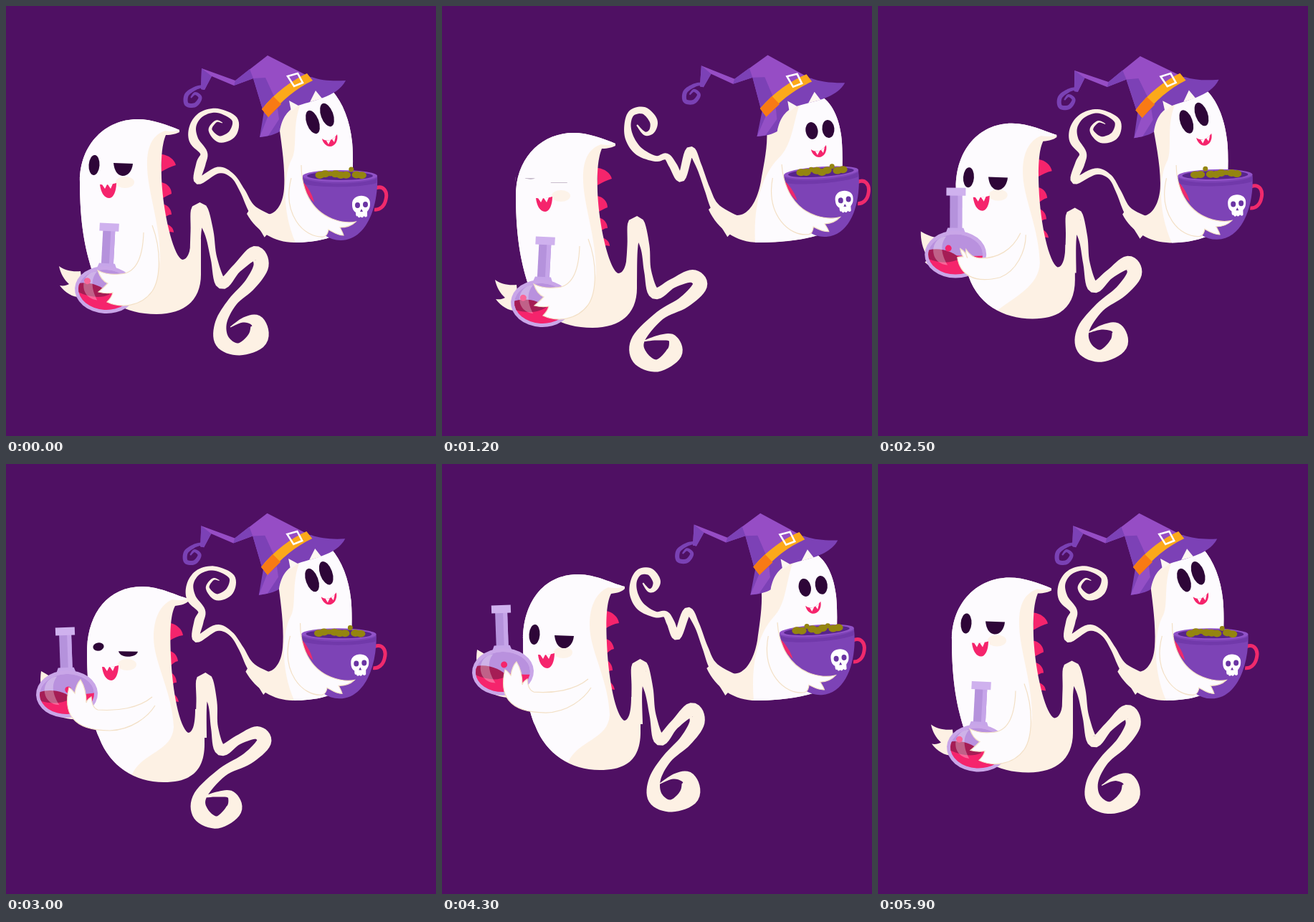
An HTML page for the animation above (6 s loop, 600x600 px).

```html
<!DOCTYPE html>
<html lang="en">
<head>
<meta charset="utf-8">
<title>Two ghosts</title>
<style>
html, body { margin: 0; width: 100%; height: 100%; overflow: hidden; background: #4f1063; }
svg { display: block; width: 100vw; height: 100vh; }
</style>
</head>
<body>
<svg viewBox="0 0 600 600" xmlns="http://www.w3.org/2000/svg">
  <defs><clipPath id="glass"><ellipse rx="38" ry="28"/></clipPath></defs>
  <rect width="600" height="600" fill="#4f1063"/>

  <g id="potion">
    <path id="tailL" fill="#fdf1e4"/>
    <g id="bodyL">
      <path id="spikes" fill="#f5246c"/>
      <path id="skinL" fill="#fdf1e4"/>
      <path id="lightL" fill="#fdfbfe"/>
      <g id="faceL">
        <ellipse cx="166" cy="246" rx="13" ry="8" fill="#fdf3e9"/>
        <path d="M131 249C139 250 147 249 154 247C154 258 150 268 144 268C136 268 132 258 131 249Z" fill="#f5246c"/>
        <path d="M134 249l4 6 3-6zM142 249l4 6 3-7z" fill="#fdfbfe"/>
      </g>
      <g fill="#2e0638">
        <g id="eyeL1"><ellipse rx="7.5" ry="14" transform="rotate(4)"/></g>
        <g id="eyeL2"><path d="M-13-9L14-8C13 3 6 10-1 9C-8 8-12 1-13-9Z"/></g>
      </g>
      <path id="farHand" fill="#fdf1e4"/>
      <g id="flask">
        <rect x="-8" y="-84" width="17" height="56" fill="#b592dc"/>
        <rect x="3" y="-84" width="6" height="56" fill="#c6a5e9"/>
        <rect x="-13" y="-93" width="27" height="11" fill="#cfb1ee"/>
        <path d="M-11-37h22l3 8h-28z" fill="#c6a5e9"/>
        <ellipse rx="43" ry="33" fill="#c9a6e8"/>
        <g clip-path="url(#glass)">
          <ellipse rx="38" ry="28" fill="#b991de"/>
          <g id="liquid">
            <path d="M-60-4C-30-8-10 8 60 0V50H-60Z" fill="#f5246c"/>
            <path d="M-44-4C-25-12-2-4 6 6C-8 14-25 12-44 4Z" fill="#a51d55"/>
          </g>
          <circle id="bubble" r="4.5" fill="#f5246c"/>
          <path d="M-31-8C-29-20-20-25-13-25C-22-14-20 0-11 15C-24 14-32 5-31-8Z" fill="#fff" opacity=".3"/>
        </g>
      </g>
      <path id="armL" fill="#fdfbfe" stroke="#f3e0c6" stroke-width="1.2"/>
    </g>
  </g>

  <g id="witch">
    <path id="tailR" fill="#fdf1e4"/>
    <path id="skinR" fill="#fdf1e4"/>
    <path id="lightR" fill="#fdfbfe"/>
    <ellipse id="eyeR1" fill="#2e0638"/>
    <ellipse id="eyeR2" fill="#2e0638"/>
    <g id="mouthR">
      <path d="M-11-3C-5 2 4 0 10-9C12 0 7 8 0 8C-5 8-10 3-11-3Z" fill="#f5246c"/>
      <path d="M-5 0l3 5 3-6zM3-2l3 4 2-8z" fill="#fdfbfe"/>
    </g>
    <g id="hat">
      <path id="curl" fill="#7a41b4"/>
      <path d="M365 69L320 104L273 87L272 116L277 117L287 98L318 111L345 101L358 144L426 100Z" fill="#964dc5"/>
      <path d="M273 87L272 116L277 117L287 98ZM320 104L318 111L345 101L340 88Z" fill="#7c41b6"/>
      <path d="M345 101L362 100L374 126L358 144Z" fill="#7c41b6"/>
      <path d="M360 147L354 183C366 182 376 179 382 175C385 155 394 145 405 140C425 132 462 128 474 104C455 105 440 104 426 99Z" fill="#7c41b6"/>
      <path d="M365 155L379 143L381 158L366 181L354 183Z" fill="#9450c6"/>
      <path d="M398 147L395 132L408 139ZM424 134L432 118L441 129Z" fill="#fdf6f2"/>
      <path d="M357 144C375 121 400 103 420 94L428 104C405 115 385 131 366 155Z" fill="#fca91a"/>
      <path d="M357 144L373 126L384 137L366 155Z" fill="#f97a14"/>
      <path d="M393 98L407 94L414 107L402 112Z" fill="none" stroke="#fff" stroke-width="2.6"/>
    </g>
    <g id="cup">
      <path d="M516 254C526 250 533 258 530 270C528 280 521 285 514 284" fill="none" stroke="#f02a6c" stroke-width="5"/>
      <path d="M414 237C412 275 430 327 467 327C505 327 520 275 518 237Z" fill="#7d43b6"/>
      <path d="M414 240C430 250 500 250 518 240L517 247C495 254 435 254 415 248Z" fill="#7139aa"/>
      <ellipse cx="466" cy="237" rx="52" ry="8" fill="#9152c8"/>
      <ellipse cx="466" cy="237" rx="46" ry="6" fill="#57248b"/>
      <g id="brew" fill="#94850f"></g>
      <path d="M415 246C417 258 422 267 430 274C428 264 421 252 415 246Z" fill="#f02a6c"/>
      <path d="M483 277C482 261 509 261 508 276C508 283 505 285 504 287L504 293Q502 296 499.500 293Q497 297 495 294Q492 297 490.500 293Q488 295 488 288C485 286 483 283 483 277Z" fill="#fff"/>
      <path d="M487 278a3.500 4 0 1 0 7 0a3.500 4 0 1 0-7 0M498 277a3.500 4 0 1 0 7 0a3.500 4 0 1 0-7 0M496 283l-2 4h4z" fill="#6a34a3"/>
    </g>
    <g id="armR">
      <path d="M412 222C412 255 425 285 455 297C468 302 478 303 488 301C482 307 474 309 466 309C468 313 470 316 471 320C462 320 456 315 450 312C449 318 447 321 443 322C415 324 385 290 398 240" fill="#fdfbfe" stroke="#f3e0c6" stroke-width="1.2"/>
    </g>
  </g>
</svg>
<script>
const LOOP = 6000;
const ui = {};
document.querySelectorAll('svg [id]').forEach(n => ui[n.id] = n);
const set = (id, name, value) => ui[id].setAttribute(name, value);
const lerp = (a, b, k) => a + (b - a) * k;
const smooth = (t, a, b) => {
  const k = Math.min(1, Math.max(0, (t - a) / (b - a)));
  return k * k * (3 - 2 * k);
};

// Smooth curve through [time, value] pairs, flat at both ends.
function track(keys, t) {
  const slope = i => i < 1 || i > keys.length - 2 ? 0
    : (keys[i + 1][1] - keys[i - 1][1]) / (keys[i + 1][0] - keys[i - 1][0]);
  let i = 0;
  while (i < keys.length - 2 && t > keys[i + 1][0]) i++;
  const [t0, a] = keys[i], [t1, b] = keys[i + 1], h = t1 - t0, k = (t - t0) / h;
  const k2 = k * k, k3 = k2 * k;
  return a * (2 * k3 - 3 * k2 + 1) + b * (3 * k2 - 2 * k3)
    + h * (slope(i) * (k3 - 2 * k2 + k) + slope(i + 1) * (k3 - k2));
}

const numbers = s => s.match(/-?[\d.]+/g).map(Number);
const weigh = (lists, w) => lists[0].map((_, i) => lists.reduce((sum, l, j) => sum + l[i] * w[j], 0));

// Paths with equal commands, blended by weights.
function morph(...poses) {
  const lists = poses.map(numbers), words = poses[0].split(/-?[\d.]+/);
  return w => {
    const v = weigh(lists, w);
    return words.map((s, i) => s + (i < v.length ? v[i].toFixed(2) : '')).join('');
  };
}

// Ribbon outline from a flat list of x, y, width.
function ribbon(p) {
  const n = p.length / 3, at = (i, c) => p[Math.min(n - 1, Math.max(0, i)) * 3 + c];
  const spline = (i, k, c) => {
    const a = at(i - 1, c), b = at(i, c), d = at(i + 1, c), e = at(i + 2, c);
    return b + .5 * k * (d - a + k * (2 * a - 5 * b + 4 * d - e + k * (3 * (b - d) + e - a)));
  };
  const mid = [];
  for (let i = 0; i < n - 1; i++)
    for (let k = 0; k < 1; k += .125) mid.push([0, 1, 2].map(c => spline(i, k, c)));
  mid.push([0, 1, 2].map(c => at(n - 1, c)));
  const left = [], right = [];
  mid.forEach(([x, y, w], i) => {
    const a = mid[Math.max(0, i - 1)], b = mid[Math.min(mid.length - 1, i + 1)];
    const dx = b[0] - a[0], dy = b[1] - a[1], s = Math.max(w, .5) / 2 / (Math.hypot(dx, dy) || 1);
    left.push((x - dy * s).toFixed(2) + ' ' + (y + dx * s).toFixed(2));
    right.unshift((x + dy * s).toFixed(2) + ' ' + (y - dx * s).toFixed(2));
  });
  return 'M' + left.concat(right).join('L') + 'Z';
}

// Potion ghost: flask low, flask raised
const skinL = morph(
  'M242 173C225 166 205 158 183 158C140 158 103 192 103 245C103 310 112 345 122 375C133 410 165 430 210 430C250 430 273 410 272 372L272 325L258 325C258 345 252 354 246 354C234 350 219 290 217 240C216 205 219 190 223 180C232 180 238 178 242 176Z',
  'M255 171C238 167 215 154 190 154C140 154 113 195 113 245C113 290 118 340 130 365C145 405 180 427 220 427C260 427 278 410 277 370L277 325L264 325C264 348 260 358 254 358C242 350 232 300 230 250C228 210 231 190 236 181C245 180 251 178 255 174Z');
const lightL = morph(
  'M242 173C225 166 205 158 183 158C140 158 103 192 103 245C103 310 112 345 122 375C127 393 138 408 155 417C190 415 215 380 215 350C214 300 198 260 197 225C196 195 205 180 222 174C230 176 236 175 242 173Z',
  'M255 171C238 167 215 154 190 154C140 154 113 195 113 245C113 290 118 340 130 365C139 388 155 407 176 416C190 385 232 385 234 350C232 300 206 260 206 225C206 200 214 180 232 172C240 174 248 173 255 171Z');
const armL = morph(
  'M192 316C191 350 182 374 158 374C148 375 138 374 128 369C131 378 135 384 142 387C138 391 134 395 129 399C137 401 143 401 149 400C148 405 145 409 141 413C160 422 188 420 204 398C216 380 217 340 204 306',
  'M204 300C185 316 155 320 128 318C122 316 119 308 119 300C116 302 113 304 112 308C112 294 109 284 104 276C99 281 97 288 96 295C93 291 90 288 88 287C80 320 90 347 145 347C175 346 198 328 208 312');
const farHand = morph(
  'M74 363C82 369 92 371 104 370L108 406C96 408 84 402 75 390C80 391 84 390 88 388C81 382 76 373 74 363Z',
  'M49 259C55 262 60 266 70 270L100 326C85 327 70 322 58 314C58 312 56 306 54 300C48 288 47 272 49 259Z');
const spikes = morph(
  'M217 207C227 208 235 214 237 222C230 224 224 227 217 231ZM216 246C225 247 231 254 231 262C226 264 222 266 217 269ZM217 276C226 277 231 284 231 291C227 291 224 293 219 296ZM222 304C229 305 234 310 234 316C231 315 228 315 225 316Z',
  'M229 205C238 206 246 214 247 222C240 223 234 226 229 229ZM228 244C235 245 239 251 240 258C235 259 232 262 228 266ZM228 273C234 275 238 281 238 288C234 288 231 290 228 293ZM230 302C236 304 240 309 241 315C237 314 234 314 231 315Z');
const tailL = [
  '264 365 16 265 315 15 270 285 22 283 315 13 290 352 9 301 387 16 322 366 13 347 345 20 356 362 21 341 388 17 316 413 13 300 442 16 302 468 21 325 479 17 351 464 28 350 441 20 332 438 7 313 448 1',
  '264 384 16 266 334 15 271 304 22 283 335 13 287 370 10 297 401 16 322 387 13 349 377 18 360 390 20 338 413 17 304 432 13 274 465 18 276 490 23 300 502 17 324 484 22 321 464 12 302 463 7 280 468 1'
].map(numbers);

// Witch ghost: near, far, returning
const skinR = morph(
  'M380 160C384 190 390 225 388 255C386 282 372 294 360 290C350 290 345 284 342 280L336 290C350 315 375 330 402 330C430 330 470 325 475 300C485 260 485 210 483 190C480 160 470 135 455 118L400 130Z',
  'M452 165C457 190 448 225 445 245C440 272 428 292 412 292C400 291 390 284 381 276L372 284C385 312 410 330 442 330C475 330 545 325 550 300C560 260 560 200 557 180C553 150 540 130 525 124L480 135Z',
  'M388 160C394 190 405 225 404 255C401 282 388 300 374 296C365 294 360 288 356 284L350 292C360 315 388 331 417 331C445 331 485 320 490 300C498 260 498 205 496 190C493 160 484 135 470 122L410 132Z');
const lightR = morph(
  'M412 135C398 165 408 200 398 215C386 240 386 290 404 330C430 330 470 325 475 300C485 260 485 210 483 190C480 160 470 135 455 118Z',
  'M498 140C490 165 488 195 470 212C450 232 434 270 437 330C475 330 545 325 550 300C560 260 560 200 557 180C553 150 540 130 525 124Z',
  'M422 138C408 165 420 205 412 222C400 245 402 290 420 331C445 331 485 320 490 300C498 260 498 205 496 190C493 160 484 135 470 122Z');
const tailR = [
  '372 310 34 344 284 12 330 258 7 316 237 6 296 229 9 268 244 10 272 220 13 276 205 10 262 187 13 261 167 9 273 151 7 295 146 6 319 158 8 316 178 11 298 186 9 285 173 5 293 161 3 302 163 1',
  '410 310 34 382 282 13 370 255 8 358 222 8 346 202 12 334 240 11 322 222 11 313 210 9 298 213 8 275 203 12 262 185 12 259 165 9 265 149 9 282 146 10 295 160 11 293 174 8 283 178 5 272 166 2',
  '385 315 34 358 290 12 346 262 7 336 240 6 316 233 9 286 243 10 298 220 13 302 206 10 292 188 12 294 170 10 308 155 7 330 149 5 355 163 8 352 183 11 332 187 9 318 174 5 328 163 3 340 167 1'
].map(numbers);
// eye x y ry tilt, eye x y ry tilt, mouth x y, hat x y turn, cup x y turn
const rig = [
  [428, 162, 17, -20, 448, 152, 17, -20, 452, 188, 0, 0, 0, 0, 0, 0],
  [516, 174, 12, -10, 539, 171.5, 12.5, -6, 526, 203, 87, 1, 2, 66, -5, -4],
  [436, 161, 17, -20, 459, 150, 17, -20, 462, 185, 8, 0, -3, 15, -3, -3]
];
const farKeys = [[0, 0], [425, .7], [690, .96], [900, 1.04], [1172, 1], [1252, .88], [1372, .55],
  [1600, .22], [1800, .08], [1950, 0], [3000, 0]];
const backKeys = [[0, 0], [1172, 0], [1252, .12], [1372, .45], [1600, .78], [1800, .92], [1950, 1],
  [2500, .3], [2900, -.12], [3000, 0]];
const blinkKeys = [[0, 1], [850, 1], [1000, .42], [1120, .05], [1230, .05], [1400, 1], [2000, 1]];

set('curl', 'd', ribbon(numbers('275 112 4 264 115 5 252 124 6 252 137 6 264 138 6 271 128 5 264 122 4 258 128 2')));

const lumps = [];
for (let i = 0; i < 9; i++) {
  const c = document.createElementNS('http://www.w3.org/2000/svg', 'ellipse');
  c.setAttribute('cx', 438 + i * 7.3);
  ui.brew.append(c);
  lumps.push(c);
}

function drawPotion(t) {
  const bob = (1 - Math.cos(Math.PI * t / 1000)) / 2;
  const r = smooth(t, 2200, 2750) * (1 - smooth(t, 5350, 5850));
  const low = bob / .905, high = (bob - .206) / .794;
  const w = [1 - r, r], k = lerp(low, high, r);
  const extra = r * high;
  const paths = { skinL, lightL, armL, farHand, spikes };
  for (const id in paths) set(id, 'd', paths[id](w));
  set('bodyL', 'transform', `translate(0 ${lerp(19 * low, 17 * high, r)})`);
  set('armL', 'transform', `translate(0 ${8 * extra})`);
  set('farHand', 'transform', `translate(0 ${13 * extra})`);
  const turn = lerp(3, -2, r);
  set('flask', 'transform', `translate(${lerp(139, 85, r)} ${lerp(396, 290, r) + 14 * extra}) rotate(${turn})`);
  set('liquid', 'transform', `rotate(${5 * Math.cos(Math.PI * t / 1000) - turn})`);
  set('bubble', 'cx', lerp(-26, 2, r));
  set('bubble', 'cy', -11 + 5 * bob);
  set('faceL', 'transform', `translate(${3 * r} ${17 * r})`);
  const lid = Math.min(1, track(blinkKeys, t % 2000));
  set('eyeL1', 'transform', `translate(${lerp(123, 129, r)} ${lerp(222, 238, r)}) scale(1 ${lid})`);
  set('eyeL2', 'transform', `translate(${lerp(163, 170, r)} ${lerp(228, 248, r)}) scale(1 ${lid})`);
  const tail = weigh(tailL, [1 - k, k]), last = tail.length / 3 - 1;
  for (let i = 0; i <= last; i++) {
    tail[i * 3] += r * lerp(8, -9, i / last);
    tail[i * 3 + 1] -= 2 * r;
  }
  set('tailL', 'd', ribbon(tail));
}

function drawWitch(t) {
  const p = (t - 80 * Math.sin(Math.PI * t / LOOP) ** 2 + 3000) % 3000;
  const far = track(farKeys, p), back = track(backKeys, p);
  const w = [1 - far - back, far, back];
  set('skinR', 'd', skinR(w));
  set('lightR', 'd', lightR(w));
  set('tailR', 'd', ribbon(weigh(tailR, w)));
  const v = weigh(rig, w);
  ['eyeR1', 'eyeR2'].forEach((id, i) => {
    const [x, y, ry, tilt] = v.slice(i * 4);
    set(id, 'rx', 8.5);
    set(id, 'ry', ry);
    set(id, 'transform', `translate(${x} ${y}) rotate(${tilt})`);
  });
  set('mouthR', 'transform', `translate(${v[8]} ${v[9]})`);
  const lift = p < 1000 ? 10 * far * (1 - far) : 0;
  set('hat', 'transform', `translate(${v[10]} ${v[11] - lift}) rotate(${v[12]} 412 140)`);
  const hold = `translate(${v[13]} ${v[14]}) rotate(${v[15]} 467 280)`;
  set('cup', 'transform', hold);
  set('armR', 'transform', hold);
  lumps.forEach((c, i) => {
    const s = Math.sin(2 * Math.PI * (t / 1000 + i * .37));
    const small = i % 4 === 2;
    c.setAttribute('cy', 237 - (small ? 6 + 3 * s : 1 + s + i % 2));
    c.setAttribute('rx', small ? 3.5 : 6.5);
    c.setAttribute('ry', small ? 3.5 : 5);
  });
}

function draw(now) {
  const t = now % LOOP;
  drawPotion(t);
  drawWitch(t);
}

const start = performance.now();
function tick() {
  draw(performance.now() - start);
  requestAnimationFrame(tick);
}
tick();
</script>
</body>
</html>
```
